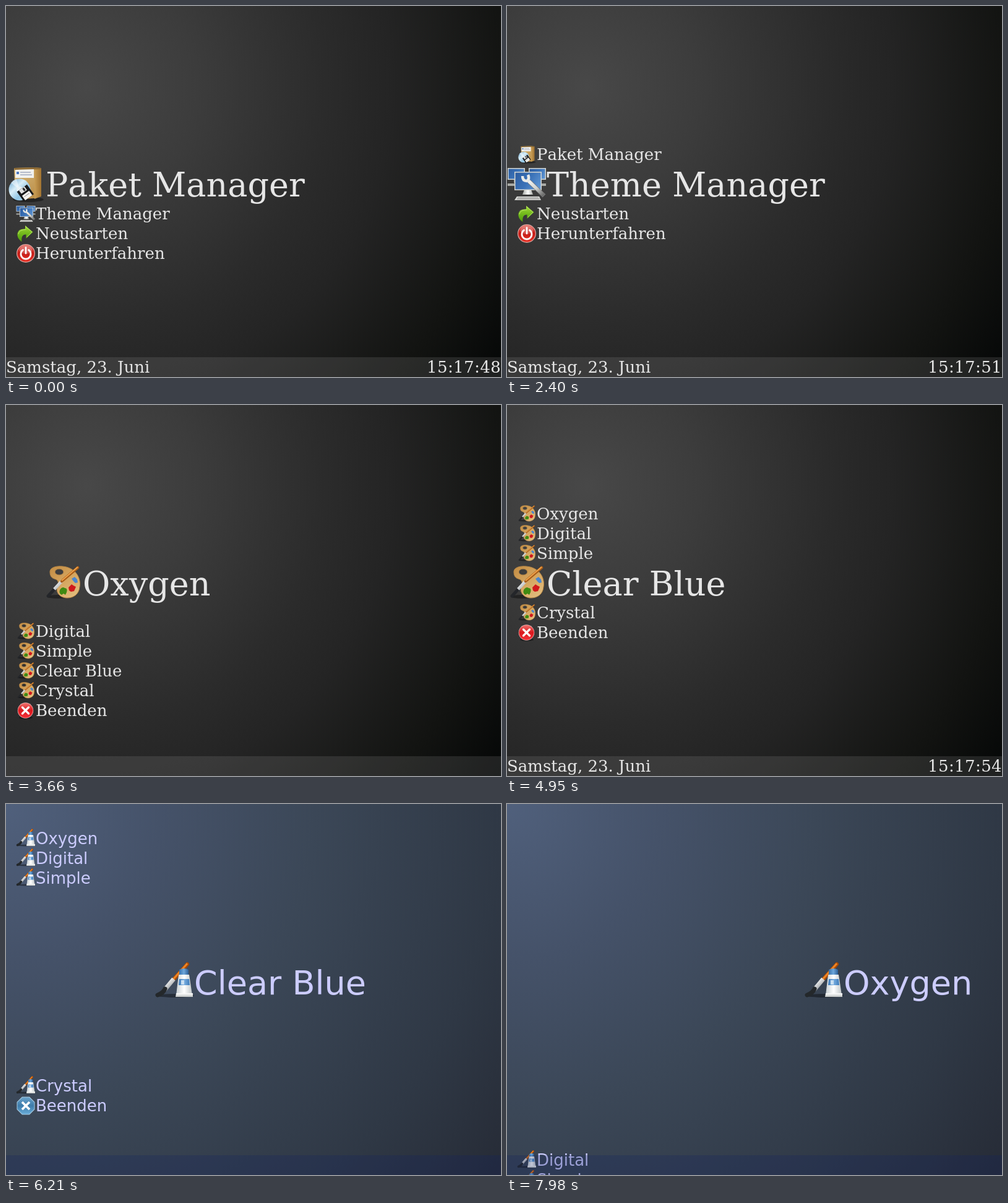
An HTML page with a canvas that plays this animation: 800x600 px, repeating every 8 s.

```html
<!DOCTYPE html>
<html lang="de">
<head>
<meta charset="utf-8">
<title>Menü</title>
<style>
html, body { margin: 0; overflow: hidden; background: #000 }
canvas { display: block }
</style>
</head>
<body>
<canvas id="stage" width="800" height="600"></canvas>
<script>
const c = document.getElementById('stage').getContext('2d');
const LOOP = 8000, STEP = 30;

// ---- drawing helpers ----
function fade(x0, y0, x1, y1, ...colors) {
  const g = c.createLinearGradient(x0, y0, x1, y1);
  colors.forEach((col, i) => g.addColorStop(i / (colors.length - 1), col));
  return g;
}
function glow(x, y, r, stops) {
  const g = c.createRadialGradient(x, y, 0, x, y, r);
  stops.forEach(([p, col]) => g.addColorStop(p, col));
  return g;
}
function shape(d, fill) {
  c.fillStyle = fill;
  c.fill(new Path2D(d));
}
function stroke(d, color, width, cap = 'butt') {
  c.strokeStyle = color;
  c.lineWidth = width;
  c.lineCap = cap;
  c.stroke(new Path2D(d));
}
function rect(x, y, w, h, fill) {
  c.fillStyle = fill;
  c.fillRect(x, y, w, h);
}
function oval(x, y, rx, ry, fill) {
  c.fillStyle = fill;
  c.beginPath();
  c.ellipse(x, y, rx, ry, 0, 0, 7);
  c.fill();
}
const shadow = (x, y, rx, ry) => oval(x, y, rx, ry, 'rgba(0,0,0,.4)');

function monitor(x, y, w, h) {
  rect(x, y, w, h, '#d4d6d2');
  rect(x + 1.5, y + 1.5, w - 3, h - 3, fade(x, y, x + w, y + h, '#2b5a9e', '#3a72b8', '#6a9fda'));
}

// ---- icons on a 64 x 64 grid ----
const icons = {
  box() {
    shadow(36, 57, 25, 4);
    shape('M13 6L46 5 46 55 15 57Z', fade(13, 5, 46, 57, '#d8b878', '#b98d48'));
    shape('M46 5L57 6 57 52 46 56Z', fade(46, 0, 57, 0, '#c89d55', '#a17331'));
    shape('M13 6L46 5 57 6 56 8 14 9Z', '#8c6a35');
    shape('M15 9L45 8 45 22 15 22Z', '#f1f1ee');
    rect(17, 12, 4, 4, '#4c78c0');
    rect(23, 12, 17, 2, '#b6bccb');
    rect(23, 16, 19, 2, '#b6bccb');
    oval(22, 41, 17.5, 17.5, fade(8, 27, 36, 57, '#7fb4d8', '#d9eef8', '#8fc4e4', '#b7dcee'));
    shape('M22 41L8 30 A18 18 0 0 1 17 24Z', 'rgba(255,255,255,.5)');
    oval(22, 41, 5, 5, '#e9f2f6');
    c.save();
    c.translate(31, 46);
    c.rotate(-.62);
    rect(-10, -9, 20, 19, '#17191b');
    rect(-6, -9, 11, 7, '#dfe1e2');
    rect(0, -8, 3, 5, '#26292b');
    rect(-7, 1, 14, 9, '#f5f5f2');
    rect(-5, 4, 10, 1, '#999');
    c.restore();
  },
  screens() {
    for (const x of [1, 35]) {
      monitor(x, 6, 28, 19);
      shape(`M${x} 31H${x + 28}V35H${x}Z`, '#a9aba7');
      rect(x + 10, 25, 8, 5, '#8b8d89');
    }
    shape('M28 41H39L42 49H25Z', fade(26, 0, 42, 0, '#b0b2ae', '#fff', '#a9aba7'));
    monitor(12, 12, 44, 30);
    shape('M16 52H52L55 58H12Z', '#d9dad7');
    stroke('M17 54H51M16 56H53', '#777', .8);
    stroke('M36 28L60 51', '#777', 7);
    stroke('M35 27L59 50', fade(35, 25, 61, 52, '#f6f6f4', '#cfd1ce', '#555'), 5.5);
    stroke('M25 19Q25 27 32 27Q37 24 34 17', '#e9eae7', 4.5);
  },
  arrow() {
    shape('M30 6L55 27 33 48V35Q16 34 19 59Q2 46 5 31Q8 16 30 17Z',
      fade(0, 6, 0, 58, '#a5dc3c', '#73b91c', '#4b9a0c'));
    stroke('M31 9L52 27 35 44M8 34Q10 19 32 19', '#c4ec77', 1.5);
  },
  power() {
    oval(32, 32, 30, 30, '#d9a8a3');
    oval(32, 32, 27.5, 27.5, fade(0, 4, 0, 60, '#e4645a', '#c51b16', '#e8352a'));
    oval(32, 20, 21, 14, 'rgba(255,255,255,.22)');
    stroke('M23 21A16 16 0 1 0 41 21M32 13V32', '#fff', 5.5, 'round');
  },
  palette() {
    shadow(24, 54, 18, 3);
    const body = new Path2D('M11 14C11 3 33 3 43 8C57 14 61 29 59 38C58 51 48 56 39 56' +
      'C27 56 20 47 23 38C26 29 24 27 18 25Q11 23 11 14ZM19 14A7 5 0 1 0 33 14A7 5 0 1 0 19 14Z');
    c.fillStyle = fade(14, 6, 50, 56, '#c48e45', '#d5a660', '#e2bd7e');
    c.fill(body, 'evenodd');
    c.strokeStyle = '#b88745';
    c.lineWidth = 1;
    c.stroke(body);
    shape('M27 43Q31 37 35 40Q40 40 38 47L36 51 33 49 30 51Q25 49 27 43Z', '#3f8a12');
    shape('M41 39L46 34 49 36 53 38 50 45 45 46 42 44Z', '#d0191b');
    shape('M46 25L51 22 55 26 56 31 52 32 49 29Z', '#4a86cf');
    stroke('M8 53L20 40', '#24262a', 5, 'round');
    stroke('M18 42L31 28', fade(18, 30, 30, 42, '#fff', '#9ba0a4'), 5);
    stroke('M30 29L56 7', '#a85c17', 4.5, 'round');
    stroke('M30 28L56 6', '#eda24b', 2);
  },
  close() {
    shadow(32, 55, 22, 5);
    oval(31, 32, 25.5, 25.5, '#e9b4b4');
    oval(31, 32, 24, 24, fade(0, 8, 0, 56, '#f0736f', '#d9171c', '#f5333a'));
    stroke('M21 22L41 42M41 22L21 42', '#fff', 6.5, 'round');
  },
  tube() {
    shadow(34, 54, 30, 3);
    stroke('M53 3L26 33', '#a84a05', 6, 'round');
    stroke('M53 2L27 31', '#ec8526', 3);
    stroke('M31 27L16 45', fade(18, 31, 29, 43, '#fff', '#8d9296'), 7);
    stroke('M17 43Q14 50 5 53', '#24282b', 7, 'round');
    shape('M40 12Q48 8 55 12V20H40Z', fade(40, 0, 55, 0, '#3873ae', '#6da6da', '#2c5f98'));
    shape('M39 20H56L61 53H35Z', fade(36, 0, 60, 0, '#ccd3d6', '#fff', '#c4cacc'));
    shape('M40 27H56L57 37H39Z', fade(39, 0, 57, 0, '#3f7cbb', '#79aee0', '#3f7cbb'));
    rect(43, 29, 5, 7, '#c9dff2');
    shape('M35 50H62V56H34Z', fade(0, 50, 0, 56, '#fff', '#bfc3c2'));
  },
  octagon() {
    shape('M20 3H44L61 20V44L44 61H20L3 44V20Z', '#a8cbe2');
    shape('M21 5H43L59 21V43L43 59H21L5 43V21Z', fade(0, 5, 0, 59, '#6aa3cb', '#3d7cab', '#69acd8'));
    stroke('M20 20L44 44M44 20L20 44', '#fff', 7.5);
  }
};

// ---- themes and menus ----
const dark = {
  font: '"DejaVu Serif", serif', text: '#e6e6e6', bar: 'rgba(160,160,160,.17)',
  style: 'palette', exit: 'close',
  back: glow(130, 130, 825, [[0, '#484848'], [.22, '#3c3c3c'], [.47, '#2b2b2b'],
    [.6, '#242424'], [.83, '#121311'], [1, '#040606']])
};
const blue = {
  font: '"DejaVu Sans", sans-serif', text: '#ccccff', bar: 'rgba(18,33,96,.25)',
  style: 'tube', exit: 'octagon',
  back: glow(0, 0, 1000, [[0, '#50607c'], [.25, '#455269'], [.5, '#3b4757'],
    [.8, '#2f3845'], [1, '#262b36']])
};
const mainMenu = () => [['Paket Manager', 'box'], ['Theme Manager', 'screens'],
  ['Neustarten', 'arrow'], ['Herunterfahren', 'power']];
const themeMenu = th => ['Oxygen', 'Digital', 'Simple', 'Clear Blue', 'Crystal']
  .map(name => [name, th.style]).concat([['Beenden', th.exit]]);

// start time, menu, theme, selected row
const states = [
  [0, mainMenu, dark, 0], [2400, mainMenu, dark, 1],
  [3293, themeMenu, dark, 0], [4410, themeMenu, dark, 1],
  [4740, themeMenu, dark, 2], [4950, themeMenu, dark, 3],
  [5940, themeMenu, blue, 3], [6900, themeMenu, blue, 2],
  [7200, themeMenu, blue, 1], [7470, themeMenu, blue, 0]
];
// menus leave and come back between these times
const slides = [[2895, 3690], [5550, 6330], [7740, 8520]];

function label(str, x, y, size, th, spacing = 0) {
  c.font = size + 'px ' + th.font;
  c.letterSpacing = spacing + 'px';
  c.fillStyle = th.text;
  c.fillText(str, x, y);
}
function entry([name, icon], x, mid, big, th) {
  const scale = big ? 1 : .5;
  c.save();
  c.translate(x + (big ? 0 : 16), mid - 32 * scale);
  c.scale(scale, scale);
  icons[icon]();
  c.restore();
  label(name, x + (big ? 64 : 48), mid + (big ? 20 : 9), big ? 54 : 26, th);
}

function draw(time) {
  const t = Math.floor(time / STEP) * STEP;
  const [, menu, th, sel] = states.findLast(s => s[0] <= t);
  const slide = slides.find(([a, b]) => t >= a && t < b);
  const shift = slide ? 2 * Math.min(t - slide[0], slide[1] - t) : 0;

  rect(0, 0, 800, 600, th.back);
  menu(th).forEach((item, i) => {
    const k = i - sel, side = Math.sign(k);
    const mid = 288 + side * (16 + shift / 2) + 32 * k;
    entry(item, k ? 0 : shift, mid, !k, th);
  });
  rect(0, 568, 800, 32, th.bar);
  if (!slide) {
    const sec = 49 + Math.floor((t - 90) / 960);
    label('Samstag, 23. Juni', 0, 593, 26, th);
    label('15:17:' + sec, 680, 593, 26, th, .41);
  }
}

c.fontKerning = 'none';
const start = performance.now();
(function tick() {
  draw((performance.now() - start) % LOOP);
  requestAnimationFrame(tick);
})();
</script>
</body>
</html>
```
